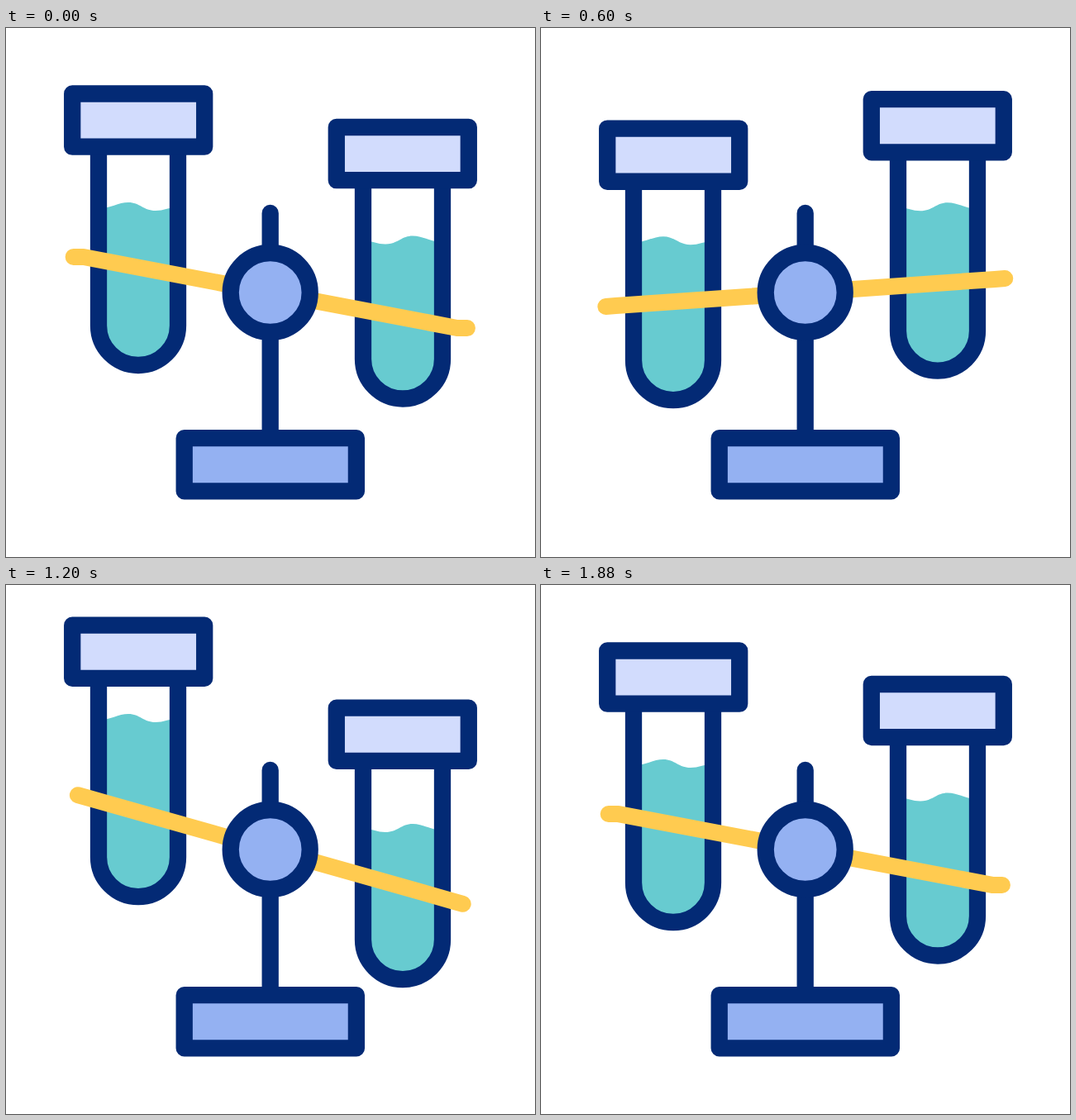
An HTML page that plays this animation: 640 by 640 pixels, repeating every 2 s.

```html
<!DOCTYPE html>
<html lang="en">
<head>
<meta charset="utf-8">
<title>Balancing test tubes</title>
<style>
  html, body { margin: 0; width: 100%; height: 100%; overflow: hidden; background: #fff; }
  svg { display: block; width: 100%; height: 100%; }
  .line { fill: none; stroke: #032a75; stroke-width: 20.3; stroke-linecap: round; stroke-linejoin: round; }
  .lid { fill: #d2dcfd; }
  .stand { fill: #94b1f2; }
  .liquid { fill: #67cbd0; }
  .beam { fill: none; stroke: #ffcb50; stroke-width: 20; stroke-linecap: round; stroke-linejoin: round; }
</style>
</head>
<body>
<svg viewBox="0 0 640 640">
  <defs>
    <g id="glass">
      <path class="line" d="M112 144V360A48 48 0 0 0 208 360V144"/>
      <rect class="line lid" x="80.2" y="79.5" width="160" height="64.2"/>
    </g>
  </defs>
  <g id="left">
    <path class="liquid"/>
    <use href="#glass"/>
  </g>
  <g id="right">
    <path class="liquid"/>
    <use href="#glass"/>
  </g>
  <path id="beam" class="beam"/>
  <path class="line" d="M319.7 224V496"/>
  <circle class="line stand" cx="319.7" cy="320" r="48"/>
  <rect class="line stand" x="215.7" y="496.2" width="208.2" height="64.2"/>
</svg>
<script>
  const LOOP = 2000, STEP = 40;
  const times = [35, 368, 697, 1084, 1504, 1885];

  // One value per entry in times
  const tracks = {
    leftY: [0, -37, 63, -49, 48.5, 0],
    rightY: [0, 47.6, -55.5, 44, -38.4, 0],
    leftSlosh: [0, -21.7, 4.6, -30.3, 2.4, 0],
    rightSlosh: [0, 26, -15, 11.4, -1.5, 0],
    angle: [10.24, 14.8, -9, 18.5, 3.9, 10.24],
    bend: [1, 0, 0, 0, 0, 1]
  };

  const ease = x => x * x * (3 - 2 * x);

  function valueAt(track, t) {
    const last = times.length - 1;
    if (t <= times[0]) return track[0];
    if (t >= times[last]) return track[last];
    const i = times.findIndex(time => time > t) - 1;
    const part = (t - times[i]) / (times[i + 1] - times[i]);
    return track[i] + (track[i + 1] - track[i]) * ease(part);
  }

  const left = document.getElementById('left');
  const right = document.getElementById('right');
  const beam = document.getElementById('beam');

  function drawTube(tube, transform, slosh) {
    tube.setAttribute('transform', transform);
    tube.firstElementChild.setAttribute('d',
      `M112 ${219 + slosh}c14-1 24-8 36-8c14 0 18 10 33 10c10 0 15-4 27-4V360A48 48 0 0 1 112 360Z`);
  }

  function draw(t) {
    const at = name => valueAt(tracks[name], t);
    drawTube(left, `translate(0 ${at('leftY')})`, at('leftSlosh'));
    drawTube(right, `translate(640 ${40.5 + at('rightY')}) scale(-1 1)`, at('rightSlosh'));

    // At rest the tips of the beam lie level
    const kink = 2.1 * at('bend');
    beam.setAttribute('d', `M-242 0L-230 ${-kink}L230 ${kink}L242 0`);
    beam.setAttribute('transform', `translate(319.8 320) rotate(${at('angle')})`);
  }

  function tick() {
    const t = (performance.now() + 1) % LOOP;
    draw(Math.floor(t / STEP) * STEP);
    requestAnimationFrame(tick);
  }
  tick();
</script>
</body>
</html>
```
